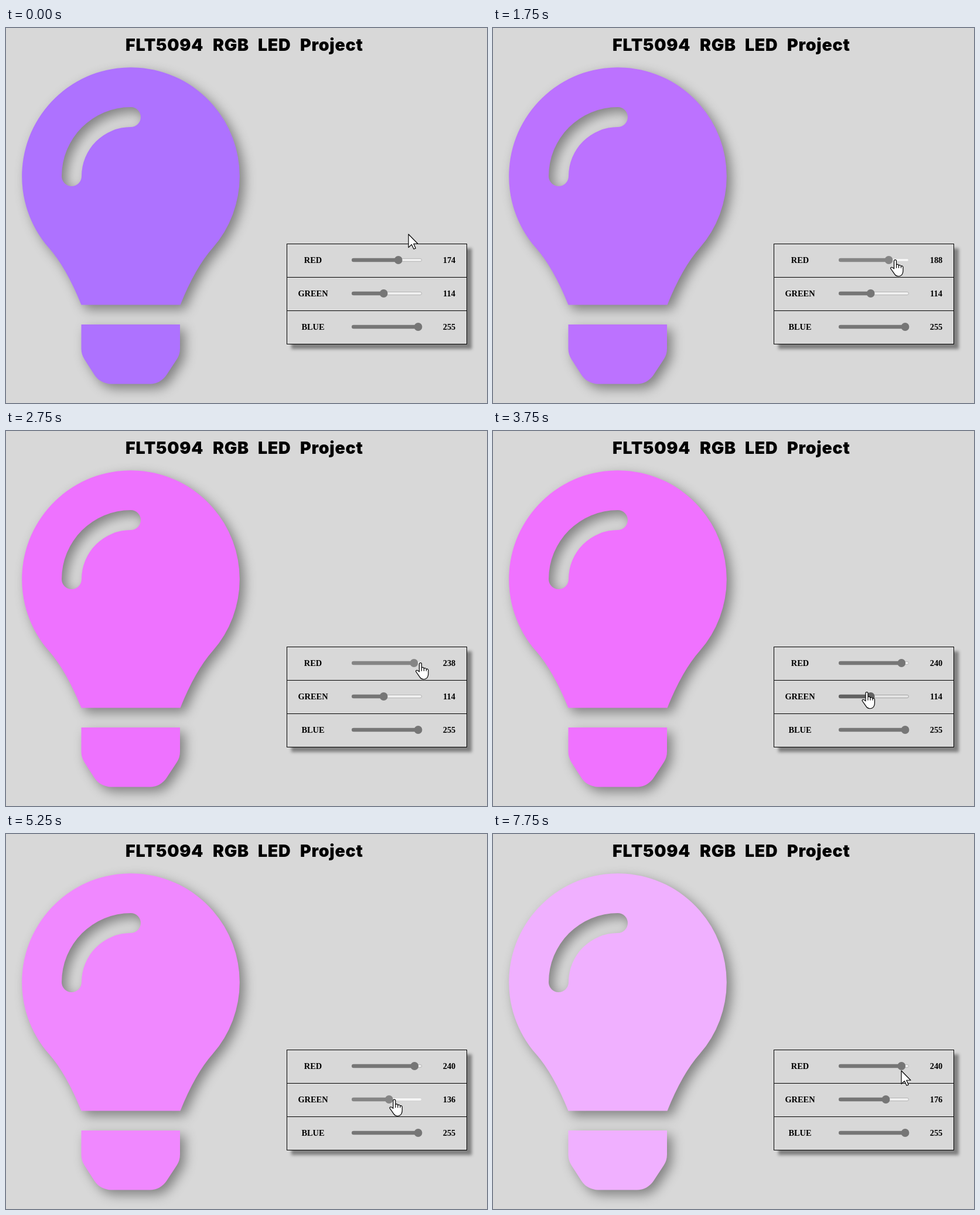
Recreate the animation shown at these times as an HTML page with a canvas. Size 821x640 px, loop 8000 ms.

```html
<!DOCTYPE html>
<html lang="en">
<head>
<meta charset="utf-8">
<title>RGB LED Project</title>
<style>
  html, body { margin: 0; width: 100%; height: 100%; overflow: hidden; background: #d8d8d8; }
  canvas { display: block; }
</style>
</head>
<body>
<canvas id="stage" width="821" height="640"></canvas>
<script>
const ctx = document.getElementById('stage').getContext('2d');
const BG = '#d8d8d8';
const LOOP = 8000;
const STEP = 250;
const ROWS = [
  { label: 'RED', y: 396 },
  { label: 'GREEN', y: 453 },
  { label: 'BLUE', y: 510 }
];

// Each drag gives one slider value per step, starting at step `from`.
const redDrag = { row: 0, from: 6, grip: 11, rest: 174, values: [180, 188, 216, 228, 236, 238, 240, 240, 240] };
const greenDrag = { row: 1, from: 20, grip: 9, rest: 114, values: [122, 136, 150, 158, 164, 168, 171, 174, 176, 176] };

// Free pointer positions by step; each holds until the next one.
const pointerPath = {
  0: [687, 352], 1: [690, 366], 2: [687, 381], 3: [683, 393], 4: [680, 396],
  15: [638, 445], 16: [643, 466], 17: [650, 464], 18: [653, 456], 19: [653, 453],
  30: [692, 428], 31: [697, 404]
};

const STYLES = {
  idle: { fill: '#767676', track: '#efefef', edge: '#b6b6b6' },
  hover: { fill: '#616161', track: '#e3e3e3', edge: '#a6a6a6' },
  active: { fill: '#858585', track: '#f5f5f5', edge: '#d2d2d2' }
};

const arrow = new Path2D('M0 0V17L4 13.2L6.8 19L9.2 18L6.6 12.2H12Z');
const hand = new Path2D(
  'M5 2Q5 .5 6.5 .5T8 2V7Q8.5 6 9.7 6.3Q10.8 6.6 11 8Q11.5 7 12.7 7.3' +
  'Q13.8 7.6 14 9Q14.5 8 15.6 8.4Q16.6 9 16.6 10V14Q16.6 18 14.7 20' +
  'Q13 21.6 10.5 21.6Q7.6 21.6 6 19.3L3 15Q1 12.4 .6 11.5Q.5 10 2 10Q3.3 10 5 12Z' +
  'M8 7V11M11 8V11M14 9V11');

function makeBulb() {
  const p = new Path2D();
  const cx = 213, cy = 253;
  const a = Math.atan2(122, 140);
  p.arc(cx, cy, 185.8, Math.PI - a, a);
  p.quadraticCurveTo(323, 409, 297.5, 472.5);
  p.lineTo(128.5, 472.5);
  p.quadraticCurveTo(103, 409, 73, 375);
  p.closePath();

  // Curved highlight, cut out by the even-odd rule
  p.moveTo(cx - 118, cy);
  p.arc(cx, cy, 118, Math.PI, 1.5 * Math.PI);
  p.arc(cx, cy - 101, 17, -Math.PI / 2, Math.PI / 2);
  p.arc(cx, cy, 84, 1.5 * Math.PI, Math.PI, true);
  p.arc(cx - 101, cy, 17, 0, Math.PI);
  p.closePath();

  p.moveTo(128.5, 506);
  p.lineTo(297, 506);
  p.arcTo(297, 557, 264, 607.5, 34);
  p.arcTo(264, 607.5, 161, 607.5, 34);
  p.arcTo(161, 607.5, 128.5, 557, 34);
  p.arcTo(128.5, 557, 128.5, 506, 34);
  p.closePath();
  return p;
}
const bulb = makeBulb();

const thumbX = value => 597 + value / 255 * 106.5;

function dragValue(drag, n) {
  if (n < drag.from) return drag.rest;
  return drag.values[Math.min(n - drag.from, drag.values.length - 1)];
}

function isDragging(drag, n) {
  return n >= drag.from && n < drag.from + drag.values.length;
}

function pointerAt(n) {
  for (const drag of [redDrag, greenDrag]) {
    if (!isDragging(drag, n)) continue;
    const y = drag === redDrag ? 395 : 453 - (n - drag.from) / 2;
    const held = n < drag.from + drag.values.length - 2;
    return { x: thumbX(dragValue(drag, n)) + drag.grip, y, row: drag.row, held };
  }
  let k = n;
  while (!pointerPath[k]) k--;
  const [x, y] = pointerPath[k];
  const row = ROWS.findIndex(r => y - r.y >= -9 && y - r.y <= 6);
  return { x, y, row, held: false };
}

function withShadow(color, blur, draw) {
  ctx.save();
  ctx.shadowColor = color;
  ctx.shadowBlur = blur;
  ctx.shadowOffsetX = ctx.shadowOffsetY = 8;
  draw();
  ctx.restore();
}

function drawTitle() {
  ctx.fillStyle = '#000';
  ctx.font = '900 28.6px Inter, "Open Sans", sans-serif';
  ctx.textAlign = 'left';
  ctx.letterSpacing = '0.7px';
  [['FLT5094', 204], ['RGB', 353], ['LED', 430], ['Project', 502]]
    .forEach(([word, x]) => ctx.fillText(word, x, 39));
  ctx.letterSpacing = '0px';
}

function drawTable() {
  withShadow('#808080', 5, () => {
    ctx.fillStyle = BG;
    ctx.fillRect(479, 368, 308, 172);
  });
  ctx.strokeStyle = '#000';
  ctx.lineWidth = 1;
  for (let i = 0; i < 3; i++) ctx.strokeRect(479.5, 368.5 + 57 * i, 307, 57);
}

function bar(x, y, w, h) {
  ctx.beginPath();
  ctx.roundRect(x, y, w, h, h / 2);
}

function drawSlider(row, value, state) {
  const { fill, track, edge } = STYLES[state];
  const x = thumbX(value);
  ctx.lineWidth = 1;
  ctx.fillStyle = track;
  ctx.strokeStyle = edge;
  bar(590.5, row.y - 2.5, 119, 5);
  ctx.fill();
  ctx.stroke();

  ctx.fillStyle = fill;
  bar(590, row.y - 3.3, x - 590, 6.6);
  ctx.fill();
  ctx.beginPath();
  ctx.arc(x, row.y, 6.9, 0, 2 * Math.PI);
  ctx.fill();

  ctx.fillStyle = '#000';
  ctx.font = 'bold 14.4px "Liberation Serif", "Times New Roman", serif';
  ctx.textAlign = 'center';
  ctx.fillText(row.label, 524, row.y + 5);
  ctx.fillText(value, 756.5, row.y + 5);
}

function drawPointer({ x, y, row }) {
  const onSlider = row >= 0;
  const shape = onSlider ? hand : arrow;
  ctx.save();
  ctx.translate(x, y);
  ctx.scale(1.33, 1.33);
  if (onSlider) ctx.translate(-6.5, 0);
  ctx.lineWidth = 0.9;
  ctx.lineJoin = 'round';
  ctx.fillStyle = '#fff';
  ctx.strokeStyle = '#000';
  ctx.fill(shape);
  ctx.stroke(shape);
  ctx.restore();
}

function render(time) {
  const n = Math.floor(time % LOOP / STEP);
  const rgb = [dragValue(redDrag, n), dragValue(greenDrag, n), 255];
  const pointer = pointerAt(n);

  ctx.fillStyle = BG;
  ctx.fillRect(0, 0, 821, 640);
  drawTitle();
  withShadow('#808080', 20, () => {
    ctx.fillStyle = `rgb(${rgb})`;
    ctx.fill(bulb, 'evenodd');
  });
  drawTable();
  ROWS.forEach((row, i) => {
    const state = i !== pointer.row ? 'idle' : pointer.held ? 'active' : 'hover';
    drawSlider(row, rgb[i], state);
  });
  drawPointer(pointer);
}

const start = performance.now();
function tick() {
  render(performance.now() - start);
  requestAnimationFrame(tick);
}
tick();
</script>
</body>
</html>
```
